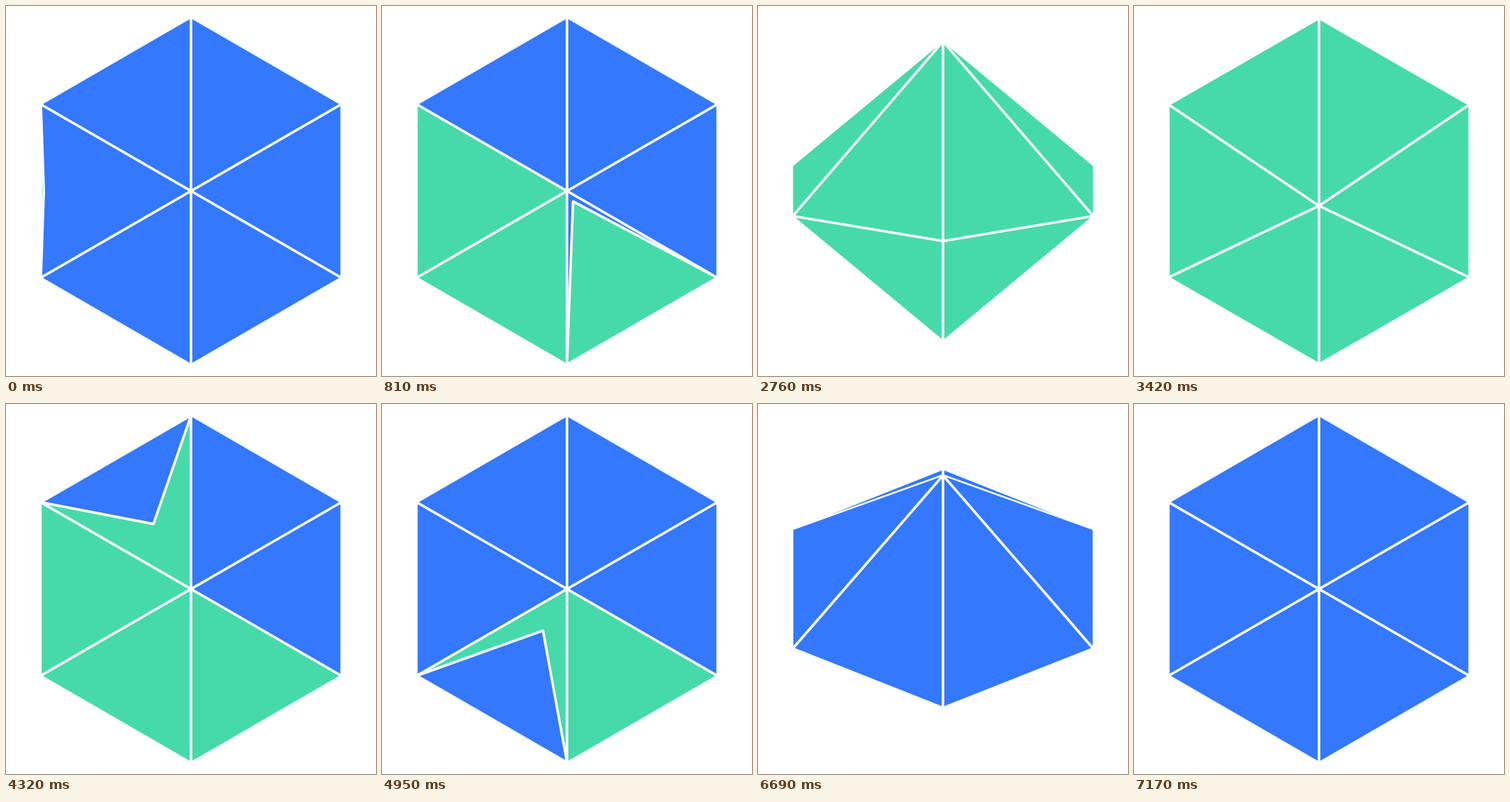
Recreate the animation shown at these times as an HTML page with a canvas. Size 512x512 px, loop 7200 ms.

```html
<!DOCTYPE html>
<html lang="en">
<head>
<meta charset="utf-8">
<title>Turning bipyramid</title>
<style>
  html, body { margin: 0; width: 100%; height: 100%; overflow: hidden; background: #fff; }
  canvas { display: block; width: 512px; height: 512px; }
</style>
</head>
<body>
<canvas id="stage" width="512" height="512"></canvas>
<script>
const ctx = document.getElementById('stage').getContext('2d');
const BLUE = '#3378ff', GREEN = '#46daaa';
const MID = 256, RADIUS = 240, HEIGHT = 216;
const LINE = 3.5, BIAS = 1.2;
const STEP = 30, FRAMES = 240, HALF = 120;
const FLAP = 10, TURN_START = 72, TURN = 48;

const smooth = p => p * p * (3 - 2 * p);
const quad = p => p < 0.5 ? 2 * p * p : 1 - 2 * (1 - p) * (1 - p);
const mix = (a, b, p) => a + (b - a) * p;

// Rotates about the horizontal axis, then projects straight onto the screen.
function project([x, y, z], turn) {
  const c = Math.cos(turn), s = Math.sin(turn);
  return [MID + x, MID + y * c - z * s, y * s + z * c];
}

function rim(deg) {
  const a = deg * Math.PI / 180;
  return [RADIUS * Math.cos(a), RADIUS * Math.sin(a), 0];
}

function face(deg, side) {
  return [[0, 0, side * HEIGHT], rim(deg - 30), rim(deg + 30)];
}

function trace(points) {
  ctx.beginPath();
  points.forEach(([x, y]) => ctx.lineTo(x, y));
  ctx.closePath();
}

function planeSlope([a, b, c]) {
  const u = b.map((v, i) => v - a[i]);
  const w = c.map((v, i) => v - a[i]);
  const nx = u[1] * w[2] - u[2] * w[1];
  const ny = u[2] * w[0] - u[0] * w[2];
  const nz = u[0] * w[1] - u[1] * w[0];
  return { nz, gx: -nx / nz, gy: -ny / nz };
}

// Pulls each edge inwards; edges the face rises from hide most of their line.
function inset(tri, gx, gy) {
  const edges = tri.map((p, i) => {
    const q = tri[(i + 1) % 3];
    const dx = q[0] - p[0], dy = q[1] - p[1], len = Math.hypot(dx, dy);
    const nx = -dy / len, ny = dx / len;
    const rise = gx * nx + gy * ny;
    const gap = rise > 0 ? Math.min(LINE / 2, BIAS / rise) : LINE / 2;
    return { nx, ny, d: nx * p[0] + ny * p[1] + gap };
  });
  return edges.map((e, i) => {
    const f = edges[(i + 2) % 3];
    const det = e.nx * f.ny - e.ny * f.nx;
    return [(e.d * f.ny - f.d * e.ny) / det, (e.nx * f.d - f.nx * e.d) / det];
  });
}

function drawFace(points, turn, color) {
  const tri = points.map(p => project(p, turn));
  const { nz, gx, gy } = planeSlope(tri);
  if (nz < 1) return;
  const small = inset(tri, gx, gy);
  const kept = (small[1][0] - small[0][0]) * (tri[1][0] - tri[0][0]) +
               (small[1][1] - small[0][1]) * (tri[1][1] - tri[0][1]);
  if (kept <= 0) return;
  trace(small);
  ctx.fillStyle = color;
  ctx.fill();
}

// Grows from the rim on even faces, from the previous face on odd ones.
function drawFlap([apex, left, right], k, p, color) {
  const [a, b, far] = k % 2 ? [apex, right, left] : [left, right, apex];
  const tip = far.map((v, i) => mix((a[i] + b[i]) / 2, v, p));
  trace([a, b, tip].map(v => project(v, 0)));
  ctx.fillStyle = color;
  ctx.fill();
  ctx.strokeStyle = '#fff';
  ctx.lineWidth = LINE;
  ctx.lineJoin = 'round';
  ctx.stroke();
}

function draw(frame) {
  const second = frame >= HALF;
  const i = frame % HALF;
  const [from, to] = second ? [GREEN, BLUE] : [BLUE, GREEN];
  const done = Math.floor((i + 1) / FLAP);
  const part = (i + 1) % FLAP / FLAP;
  const spin = i < TURN_START ? 0 : smooth((i - TURN_START + 1) / TURN) * Math.PI;
  const turn = second ? -spin : spin;

  ctx.fillStyle = '#fff';
  ctx.fillRect(0, 0, 512, 512);
  for (let k = 0; k < 6; k++) {
    const deg = (second ? 0 : 180) - 60 * k;
    const color = k < done ? to : from;
    drawFace(face(deg, 1), turn, color);
    const [apex, left, right] = face(deg, -1);
    drawFace([apex, right, left], turn, color);
    if (k === done && part > 0) drawFlap(face(deg, 1), k, quad(part), to);
  }
}

const start = performance.now();
function tick() {
  const t = Math.max(0, performance.now() - start);
  draw(Math.floor(t / STEP) % FRAMES);
  requestAnimationFrame(tick);
}
tick();
</script>
</body>
</html>
```
